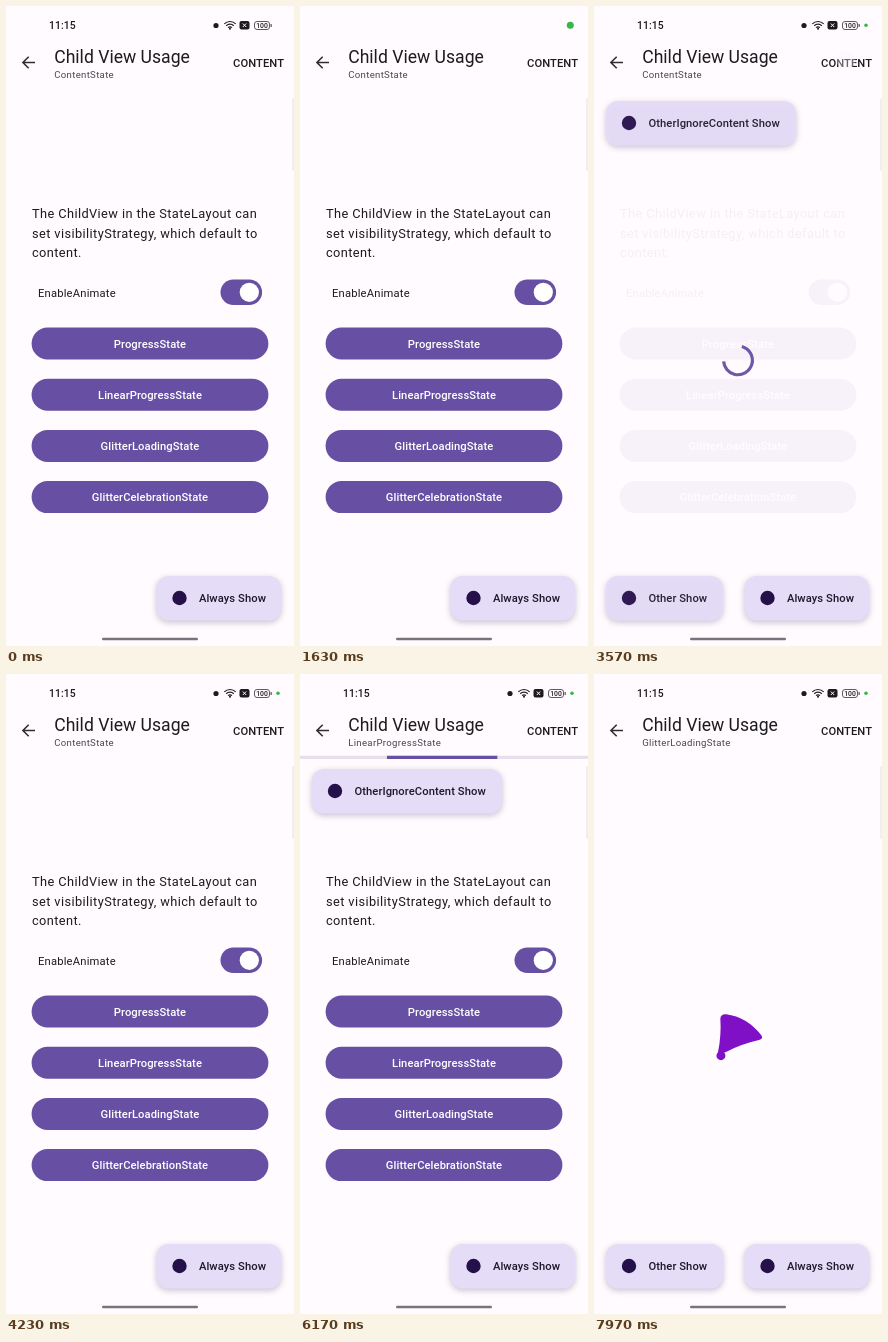
Write an HTML page with a canvas that moves like this. It is 288x640 px and loops after 8 s.

```html
<!DOCTYPE html>
<html lang="en">
<head>
<meta charset="utf-8">
<title>Child View Usage</title>
<style>
  html, body { margin: 0; width: 100%; height: 100%; overflow: hidden; background: #fffbfe; }
  canvas { display: block; width: 288px; height: 640px; }
</style>
</head>
<body>
<canvas id="stage"></canvas>
<script>
const LOOP = 8000, FADE = 350;
const BG = '#fffbfe', INK = '#1c1b1f', PURPLE = '#6750a4', CARD = '#e5dcf8', VIOLET = '#8010c6';

const canvas = document.getElementById('stage');
const ctx = canvas.getContext('2d');
const ratio = window.devicePixelRatio || 1;
canvas.width = 288 * ratio;
canvas.height = 640 * ratio;

// Each state begins at a time and shows a set of layers.
const states = [
  { at: 0, name: 'ContentState', shows: ['content'] },
  { at: 1705, name: 'ProgressState', shows: ['other', 'ignore', 'spinner'] },
  { at: 3520, name: 'ContentState', shows: ['content'] },
  { at: 4690, name: 'LinearProgressState', shows: ['content', 'ignore', 'linear'] },
  { at: 7100, name: 'GlitterLoadingState', shows: ['other', 'loading'] },
];
const taps = [
  { at: 1650, x: 144, y: 338 },
  { at: 3450, x: 252, y: 54 },
  { at: 4620, x: 144, y: 389 },
  { at: 7030, x: 144, y: 440 },
];

const clamp = v => Math.min(1, Math.max(0, v));
const span = (t, start, length) => clamp((t - start) / length);
const mix = (a, b, k) => a + (b - a) * k;
const smooth = k => 0.5 - Math.cos(Math.PI * k) / 2;

function bezier(x1, y1, x2, y2) {
  const at = (a, b, s) => 3 * (1 - s) * (1 - s) * s * a + 3 * (1 - s) * s * s * b + s * s * s;
  return x => {
    let low = 0, high = 1;
    for (let i = 0; i < 24; i++) {
      const mid = (low + high) / 2;
      if (at(x1, x2, mid) < x) low = mid; else high = mid;
    }
    return at(y1, y2, (low + high) / 2);
  };
}
const fastOutSlowIn = bezier(0.4, 0, 0.2, 1);
const barEnds = [
  { tail: [1267, 533, bezier(0.2, 0, 0.8, 1)], head: [1000, 567, bezier(0.4, 0, 1, 1)] },
  { tail: [333, 850, bezier(0, 0, 0.65, 1)], head: [0, 750, bezier(0.1, 0, 0.45, 1)] },
];

function text(str, x, y, size, { weight = 400, color = INK, spacing = 0.08, align = 'left' } = {}) {
  ctx.font = `${weight} ${size}px Roboto, sans-serif`;
  ctx.letterSpacing = spacing + 'px';
  ctx.textAlign = align;
  ctx.fillStyle = color;
  ctx.fillText(str, x, y);
}

function box(x, y, w, h, r, color) {
  ctx.fillStyle = color;
  ctx.beginPath();
  ctx.roundRect(x, y, w, h, r);
  ctx.fill();
}

function disc(x, y, r, color) {
  ctx.fillStyle = color;
  ctx.beginPath();
  ctx.arc(x, y, r, 0, 7);
  ctx.fill();
}

function stroke(color, width, trace) {
  ctx.strokeStyle = color;
  ctx.lineWidth = width;
  ctx.beginPath();
  trace();
  ctx.stroke();
}

function withAlpha(alpha, draw) {
  if (alpha <= 0) return;
  ctx.save();
  ctx.globalAlpha = alpha;
  draw();
  ctx.restore();
}

function card(x, y, w, label) {
  ctx.save();
  ctx.shadowColor = 'rgba(70, 60, 100, .3)';
  ctx.shadowBlur = 6 * ratio;
  ctx.shadowOffsetY = 2 * ratio;
  box(x, y, w, 44.5, 12, CARD);
  ctx.restore();
  disc(x + 23, y + 22, 7.2, '#25104a');
  text(label, x + 42.4, y + 26, 11.2, { weight: 500, color: '#1d192b' });
}

function statusBar(t) {
  const alpha = t < 1000 ? 1 - span(t, 200, 200) : span(t, 1680, 200);
  withAlpha(alpha, () => {
    text('11:15', 43, 23, 10.4, { weight: 500 });
    disc(210, 19.5, 2.6, INK);
    for (const r of [8, 5.3, 2.7]) {
      stroke(INK, 1.2, () => ctx.arc(224, 23.5, r, -Math.PI * 0.75, -Math.PI * 0.25));
    }
    disc(224, 22.7, 1, INK);
    box(233.5, 15, 10, 8.5, 2, INK);
    stroke(BG, 1, () => {
      ctx.moveTo(236.8, 17.5); ctx.lineTo(240.2, 21);
      ctx.moveTo(240.2, 17.5); ctx.lineTo(236.8, 21);
    });
    stroke('#5d5b62', 1, () => ctx.roundRect(248.5, 15.5, 15, 8, 2.5));
    box(264.5, 18, 1.3, 3, 0.5, '#5d5b62');
    text('100', 256, 22, 6.8, { weight: 500, align: 'center', spacing: 0 });
  });

  // The indicator grows as a pill, then shrinks to a dot.
  const shrink = smooth(span(t, 1000, 300));
  const settle = smooth(span(t, 1680, 200));
  const height = mix(mix(18, 7, shrink), 3.6, settle);
  const width = mix(mix(30, 7, shrink), 3.6, settle);
  const x = mix(mix(261, 270.3, shrink), 272, settle);
  withAlpha(span(t, 250, 200), () =>
    box(x - width / 2, 19.3 - height / 2, width, height, height / 2, '#35b84b'));
}

function appBar(name) {
  stroke('#302e33', 1.6, () => {
    ctx.moveTo(29, 56.5); ctx.lineTo(17, 56.5);
    ctx.moveTo(22.7, 50.7); ctx.lineTo(16.9, 56.5); ctx.lineTo(22.7, 62.3);
  });
  text('Child View Usage', 48.2, 56.5, 17.6, { spacing: 0 });
  text(name, 48.2, 72, 9.6, { color: '#49454f', spacing: 0.32 });
  text('CONTENT', 227, 60.6, 11.2, { weight: 500 });
}

function content() {
  ['The ChildView in the StateLayout can', 'set visibilityStrategy, which default to', 'content.']
    .forEach((line, i) => text(line, 26, 212.4 + i * 19.2, 12.8, { spacing: 0.4 }));
  text('EnableAnimate', 32, 290.8, 11.2, { spacing: 0.2 });
  box(214.5, 273.5, 41.6, 25.6, 12.8, PURPLE);
  disc(243.3, 286.3, 9.6, '#fff');
  ['ProgressState', 'LinearProgressState', 'GlitterLoadingState', 'GlitterCelebrationState']
    .forEach((label, i) => {
      const y = 321.5 + i * 51.2;
      box(25.6, y, 236.8, 32, 16, PURPLE);
      text(label, 144, y + 20, 11.2, { weight: 500, color: '#fff', align: 'center' });
    });
}

const overlays = {
  ignore() { card(12, 95, 190, 'OtherIgnoreContent Show'); },
  other() { card(12, 570, 117, 'Other Show'); },
  spinner(t) {
    const time = Math.max(0, t - 1775);
    const cycle = Math.floor(time / 1350), local = time % 1350;
    const base = time * 1520 / 5400 - 90 + cycle * 250;
    const start = base - 20 + 250 * fastOutSlowIn(span(local, 667, 667));
    const end = base + 250 * fastOutSlowIn(span(local, 0, 667));
    stroke(PURPLE, 3.2, () =>
      ctx.arc(144, 354.3, 14.4, start * Math.PI / 180, end * Math.PI / 180));
  },
  linear(t) {
    const time = Math.max(0, t - 4723) % 1800;
    box(0, 81.7, 288, 3.2, 0, '#e7e0ec');
    const place = ([delay, length, ease]) => 288 * ease(span(time, delay, length));
    for (const { tail, head } of barEnds) {
      const from = place(tail), to = place(head);
      if (to - from > 0.1) box(from, 81.7, to - from, 3.2, 0, PURPLE);
    }
  },
  loading(t) {
    ctx.translate(144, 362);
    ctx.rotate((t - 7970) * Math.PI / 1200);
    ctx.translate(-144, -362);
    ctx.fillStyle = VIOLET;
    ctx.beginPath();
    ctx.moveTo(126.3, 345);
    ctx.quadraticCurveTo(126.5, 340, 132, 340.4);
    ctx.quadraticCurveTo(153, 343, 167.5, 361.5);
    ctx.quadraticCurveTo(169.5, 364.5, 165, 366);
    ctx.quadraticCurveTo(147, 370, 131, 378.5);
    ctx.lineTo(124, 378.5);
    ctx.quadraticCurveTo(127.5, 361, 126.3, 345);
    ctx.fill();
    disc(127, 381.7, 4.5, VIOLET);
  },
};

function draw(t) {
  ctx.setTransform(ratio, 0, 0, ratio, 0, 0);
  box(0, 0, 288, 640, 0, BG);

  const index = states.findLastIndex(s => t >= s.at);
  const current = states[index], previous = states[Math.max(0, index - 1)];
  const change = smooth(span(t, current.at, FADE));
  const alphaOf = key => mix(+previous.shows.includes(key), +current.shows.includes(key), change);

  // The content fades as one group, under a veil of background.
  content();
  withAlpha(1 - alphaOf('content'), () => box(0, 190, 288, 340, 0, BG));

  box(286, 92, 4, 73, 1.5, '#f1edf1');
  statusBar(t);
  appBar(current.name);
  for (const [key, paint] of Object.entries(overlays)) {
    withAlpha(alphaOf(key), () => paint(t));
  }
  card(150.5, 570, 124.5, 'Always Show');
  box(96, 631.8, 96, 2.4, 1.2, '#77747c');

  for (const { at, x, y } of taps) {
    const alpha = t < at ? 0 : 1 - span(t, at + 80, 100);
    withAlpha(alpha, () => disc(x, y, 9.5, 'rgba(246, 244, 255, .6)'));
  }
}

function frame(now) {
  draw(now % LOOP);
  requestAnimationFrame(frame);
}
draw(0);
requestAnimationFrame(frame);
</script>
</body>
</html>
```
